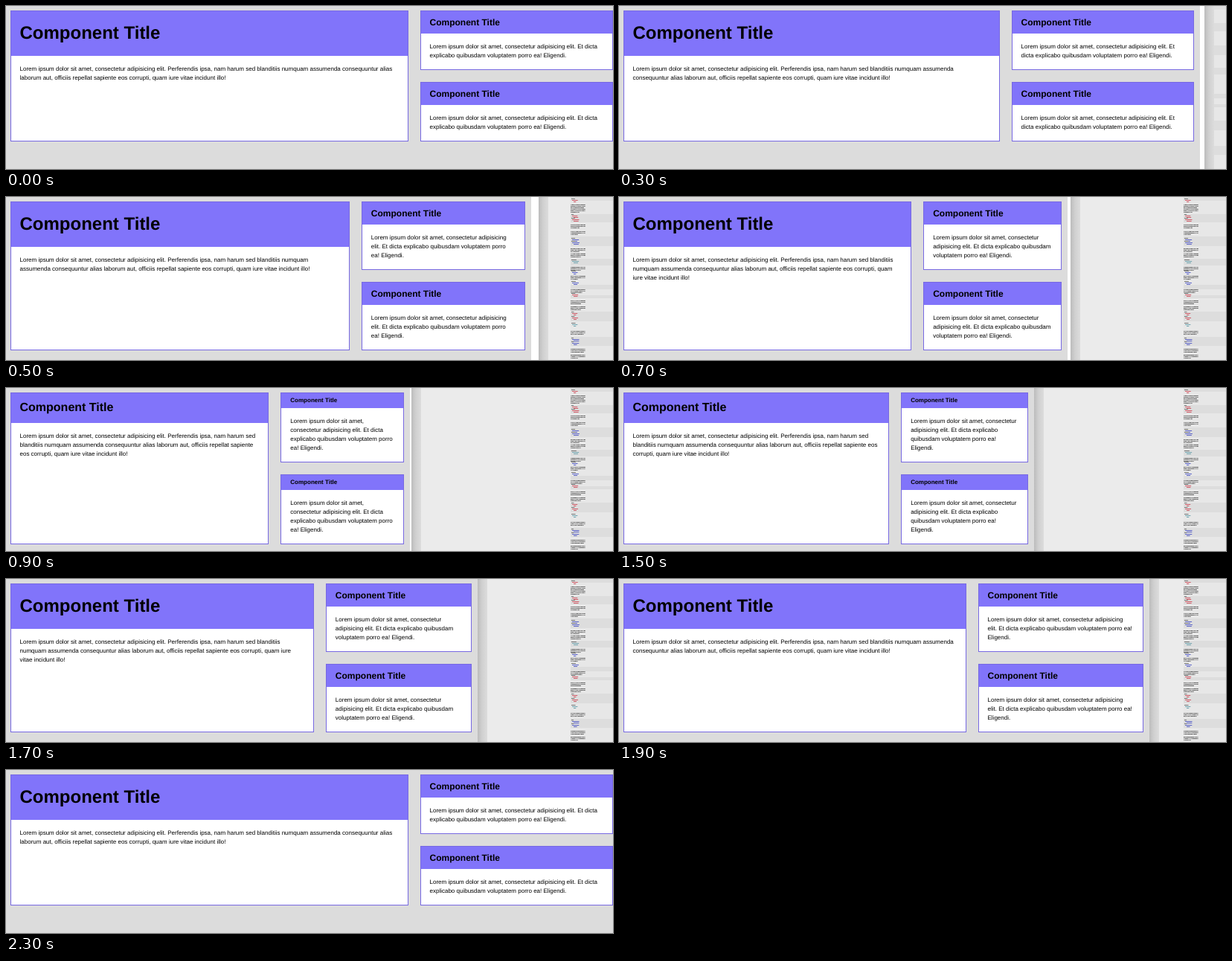
An HTML page with a canvas for the animation above (2400 ms loop, 816 px wide and 219 px high).

```html
<!DOCTYPE html>
<html lang="en">
<head>
<meta charset="utf-8">
<title>Responsive cards</title>
<style>
  html, body {
    margin: 0;
    width: 100%;
    height: 100%;
    overflow: hidden;
    background: #ebebeb;
  }
  .stage {
    position: relative;
    width: 816px;
    height: 219px;
    overflow: hidden;
    font: 8px/12px "Liberation Sans", Arial, Helvetica, sans-serif;
    text-rendering: geometricPrecision;
    color: #000;
  }
  .minimap {
    position: absolute;
    left: 759px;
    top: 0;
  }
  .page {
    --right: 816px;
    --strip: 0px;
    container-type: inline-size;
    position: absolute;
    left: 0;
    top: 0;
    box-sizing: content-box;
    width: calc(var(--right) - 5.5px);
    height: 213.5px;
    padding: 5.5px 8px 0 5.5px;
    border-right: var(--strip) solid #fff;
    background: #dcdcdc;
  }
  .shadow {
    position: absolute;
    left: calc(100% + var(--strip));
    top: 0;
    width: 13px;
    height: 219px;
    background: linear-gradient(90deg, #bcbcbc, #d0d0d0 45%, #dcdcdc);
  }
  .grid {
    display: grid;
    grid-template-columns: repeat(3, minmax(0, 1fr));
    gap: 16px;
  }
  .card {
    border: 1px solid #7769e2;
    background: #fff;
  }
  .main {
    grid-column: span 2;
    grid-row: span 2;
  }
  h2 {
    margin: 0;
    padding: .5em 12px;
    font-size: 8px;
    line-height: 1.5;
    white-space: nowrap;
    background: #8174fa;
  }
  .main h2 { font-size: 16px; }
  p {
    margin: 0;
    padding: 12px;
  }
  @container (min-width: 566px) {
    h2 { font-size: 12px; }
    .main h2 { font-size: 24px; }
  }
</style>
</head>
<body>
<div class="stage">
  <canvas class="minimap" width="57" height="219"></canvas>
  <div class="page">
    <div class="grid">
      <section class="card main">
        <h2>Component Title</h2>
        <p>Lorem ipsum dolor sit amet, consectetur adipisicing elit. Perferendis ipsa, nam harum sed blanditiis numquam assumenda consequuntur alias laborum aut, officiis repellat sapiente eos corrupti, quam iure vitae incidunt illo!</p>
      </section>
      <section class="card">
        <h2>Component Title</h2>
        <p>Lorem ipsum dolor sit amet, consectetur adipisicing elit. Et dicta explicabo quibusdam voluptatem porro ea! Eligendi.</p>
      </section>
      <section class="card">
        <h2>Component Title</h2>
        <p>Lorem ipsum dolor sit amet, consectetur adipisicing elit. Et dicta explicabo quibusdam voluptatem porro ea! Eligendi.</p>
      </section>
    </div>
    <div class="shadow"></div>
  </div>
</div>
<script>
  const LOOP = 2400, STEP = 100;

  // time, right edge of the cards, speed per step, white strip
  const keys = [
    [0, 816, 0, 0],
    [500, 698, -46, 10],
    [700, 595, -46, 4],
    [1100, 516.5, -5, 0],
    [1200, 514, 0, 0],
    [1500, 550, 32, 0],
    [1900, 705, 35, 0],
    [2300, 816, 0, 0],
    [2400, 816, 0, 0]
  ];

  function poseAt(t) {
    const i = keys.findIndex((k, n) => n > 0 && t < k[0]);
    const [t0, x0, v0, s0] = keys[i - 1];
    const [t1, x1, v1, s1] = keys[i];
    const u = (t - t0) / (t1 - t0);
    const span = (t1 - t0) / STEP;
    const w = u * u * (3 - 2 * u);
    const right = x0 + (x1 - x0) * w
      + span * u * (1 - u) * (v0 * (1 - u) - v1 * u);
    return { right, strip: s0 + (s1 - s0) * u };
  }

  function drawMinimap() {
    const ctx = document.querySelector('.minimap').getContext('2d');
    let seed = 7;
    const rand = () => (seed = (seed * 16807) % 2147483647) / 2147483647;
    const bar = (x, y, w, h, color) => {
      ctx.fillStyle = color;
      ctx.fillRect(x, y, w, h);
    };

    bar(0, 0, 57, 219, '#e7e7e7');
    for (const [y, h] of [[0, 5], [23, 11], [53, 13], [83, 9], [118, 6], [132, 4], [154, 13], [188, 12]])
      bar(0, y, 57, h, '#dddddd');

    // dense paragraphs
    for (const y of [10, 16, 37, 46, 69, 76, 94, 106, 124, 139, 147, 180, 204, 212])
      for (let r = 0; r < 3; r++) {
        const w = r < 2 ? 20 : 8 + rand() * 10;
        for (let x = 0; x < w; x += 2)
          bar(x, y + r * 2, 1.7, 1, `rgba(40,40,40,${.45 + rand() * .4})`);
      }

    // short tagged lines
    const marks = [[4, '#d05a66'], [25, '#d05a66'], [30, '#d05a66'], [57, '#5a62c8'], [61, '#5a62c8'],
      [86, '#70a5b0'], [101, '#5a62c8'], [115, '#5a62c8'], [131, '#d05a66'], [156, '#d05a66'],
      [162, '#d05a66'], [171, '#70a5b0'], [191, '#5a62c8'], [196, '#5a62c8']];
    for (const [y, color] of marks) {
      bar(1, y - 2, 3 + rand() * 4, 1, '#777');
      bar(2, y, 7 + rand() * 3, 1, color);
      bar(4, y + 2, 3 + rand() * 5, 1, color);
    }
  }

  const page = document.querySelector('.page');
  const start = performance.now();

  function render() {
    const t = (performance.now() - start) % LOOP;
    const { right, strip } = poseAt(Math.floor(t / STEP) * STEP);
    page.style.setProperty('--right', right + 'px');
    page.style.setProperty('--strip', strip + 'px');
    requestAnimationFrame(render);
  }

  drawMinimap();
  render();
</script>
</body>
</html>
```
